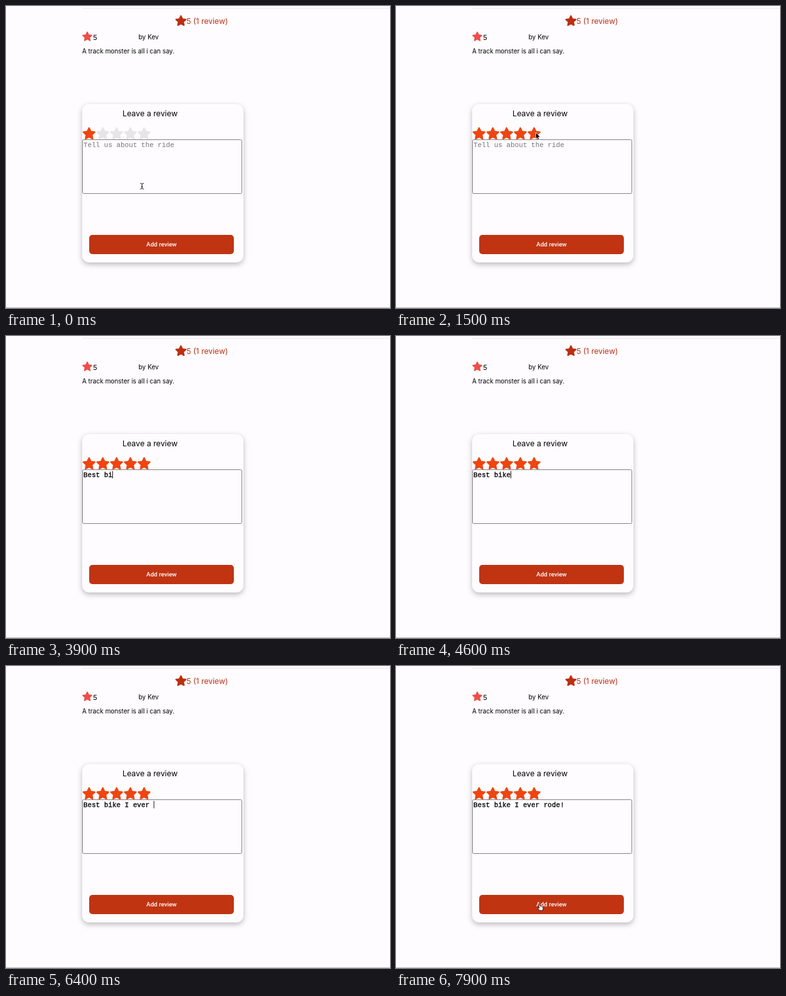
An HTML page that plays this animation: 600 px wide and 471 px high, repeating every 8 s.

```html
<!DOCTYPE html>
<html lang="en">
<head>
<meta charset="utf-8">
<title>Leave a review</title>
<style>
  html, body { margin: 0; width: 100%; height: 100%; overflow: hidden; background: #fefcfe; }
  svg { display: block; width: 600px; height: 471px; font: 9.9px Inter, sans-serif; }
  .card { fill: #fefcfe; filter: drop-shadow(0 3px 4px rgba(0, 0, 0, .27)); }
  .mono { font: 10.76px "Liberation Mono", monospace; white-space: pre; }
  .star { stroke-width: .25; stroke-linejoin: round; }
  .pointer { stroke-linejoin: round; stroke-linecap: round; }
</style>
</head>
<body>
<svg viewBox="0 0 600 471">
  <path d="M119 3.5H600" stroke="#e9e7e9"/>
  <path d="M0 470.5H600" stroke="#bbb9bb"/>
  <rect class="card" x="119" y="153" width="252" height="247" rx="11"/>
  <g id="stars"></g>
  <text x="282" y="27.6" font-size="12" fill="#b83218">5 (1 review)</text>
  <text x="136" y="52.6" font-size="11">5</text>
  <text x="207" y="52">by Kev</text>
  <text x="119" y="73.6">A track monster is all i can say.</text>
  <text x="182" y="171.6" font-size="12.2">Leave a review</text>
  <rect x="119.5" y="208.5" width="249" height="84" rx="2" fill="#fefcfe" stroke="#858385"/>
  <text id="hint" class="mono" x="121" y="220" fill="#757375">Tell us about the ride</text>
  <text id="typed" class="mono" x="121" y="220" stroke="#000" stroke-width=".3"></text>
  <path id="caret" d="M0 210.500V222" stroke="#000" stroke-width=".9"/>
  <rect x="130" y="357" width="226" height="30" rx="5" fill="#c03412"/>
  <text x="243" y="374.6" text-anchor="middle" fill="#fff" style="font: 500 9.6px Roboto, sans-serif">Add review</text>
  <g id="beam" class="pointer" fill="none" stroke="#222" stroke-width="1">
    <path d="M-2.500 -4.500Q0 -4.500 0 -3Q0 -4.500 2.500 -4.500M0 -3V3M-2.500 4.500Q0 4.500 0 3Q0 4.500 2.500 4.500M-1 1H1"/>
  </g>
  <path id="arrow" class="pointer" d="M-.5 -5.500V4.200L1.700 2.200L3.200 5.500L4.800 4.800L3.400 1.600H6.300Z"
    fill="#000" stroke="#fff" stroke-width=".7"/>
  <path id="hand" class="pointer" d="M-2.300 -4.500Q-1.300 -5.500 -.7 -4.300L.2 -1.600Q1.200 -2.300 1.800 -1.300Q2.800 -1.800 3.300 -.7Q4.500 -.8 4.700 .8L5 3L4.200 5.300H-.3L-3.500 2Q-3.700 .7 -2.500 1L-1.500 1.600Z"
    fill="#fff" stroke="#111" stroke-width=".9"/>
</svg>
<script>
const $ = id => document.getElementById(id);
const LOOP = 8000, STEP = 100, CHAR = 6.457;
const message = "Best bike I ever rode!";
const keyTimes = [3400, 3600, 3700, 3700, 3800, 3800, 3900, 4000, 4200, 4800, 5700,
  5800, 5900, 6000, 6100, 6200, 6300, 6500, 6600, 6700, 6900, 7100];
const focusTime = 2500, rateTime = 1000;
const path = [[0, 212.5, 281], [200, 212.5, 281], [1000, 219, 203], [1800, 219, 203],
  [2400, 223.5, 242], [7200, 223.5, 242], [7800, 225, 376], [8000, 225, 376]];

const starPoints = Array.from({ length: 10 }, (_, i) => {
  const r = i % 2 ? .49 : 1, a = i * Math.PI / 5;
  return [r * Math.sin(a), -r * Math.cos(a)].map(v => v.toFixed(3)).join();
}).join(" ");

function addStar(x, y, size, color) {
  const star = document.createElementNS("http://www.w3.org/2000/svg", "polygon");
  star.setAttribute("class", "star");
  star.setAttribute("points", starPoints);
  star.setAttribute("transform", `translate(${x} ${y}) scale(${size})`);
  paint(star, color);
  $("stars").append(star);
  return star;
}

function paint(star, color) {
  star.setAttribute("fill", color);
  star.setAttribute("stroke", color);
}

addStar(273.3, 23.5, 8.1, "#bb2f10");
addStar(127, 48, 7.2, "#ee4e4b");
const rating = [0, 1, 2, 3, 4].map(i => addStar(129.8 + i * 21.5, 199.5, 9.3, "#ef4510"));

function pointerAt(t) {
  const i = path.findIndex(p => p[0] > t);
  const [t0, x0, y0] = path[i - 1], [t1, x1, y1] = path[i];
  const u = (t - t0) / (t1 - t0), e = u * u * (3 - 2 * u);
  return [x0 + (x1 - x0) * e, y0 + (y1 - y0) * e];
}

const show = (id, on) => $(id).setAttribute("visibility", on ? "visible" : "hidden");

function draw(now) {
  const t = Math.floor(now % LOOP / STEP) * STEP;
  const count = keyTimes.filter(k => k <= t).length;
  rating.forEach((star, i) => paint(star, i === 0 || t >= rateTime ? "#ef4510" : "#e6e5e7"));

  $("typed").textContent = message.slice(0, count);
  show("hint", count === 0);
  const lastInput = count ? keyTimes[count - 1] : focusTime;
  show("caret", t >= focusTime && (t - lastInput) % 1000 < 500);
  $("caret").setAttribute("transform", `translate(${121.4 + count * CHAR} 0)`);

  // The pointer hides while typing and takes its shape from what lies below it.
  const [x, y] = pointerAt(t);
  const shape = y > 357 ? "hand" : y > 208 && y < 293 ? "beam" : "arrow";
  const visible = t < keyTimes[0] || t >= 7300;
  for (const id of ["beam", "arrow", "hand"]) show(id, visible && id === shape);
  $(shape).setAttribute("transform", `translate(${x} ${y})`);
}

const start = performance.now();
function tick() {
  draw(performance.now() - start);
  requestAnimationFrame(tick);
}
tick();
</script>
</body>
</html>
```
